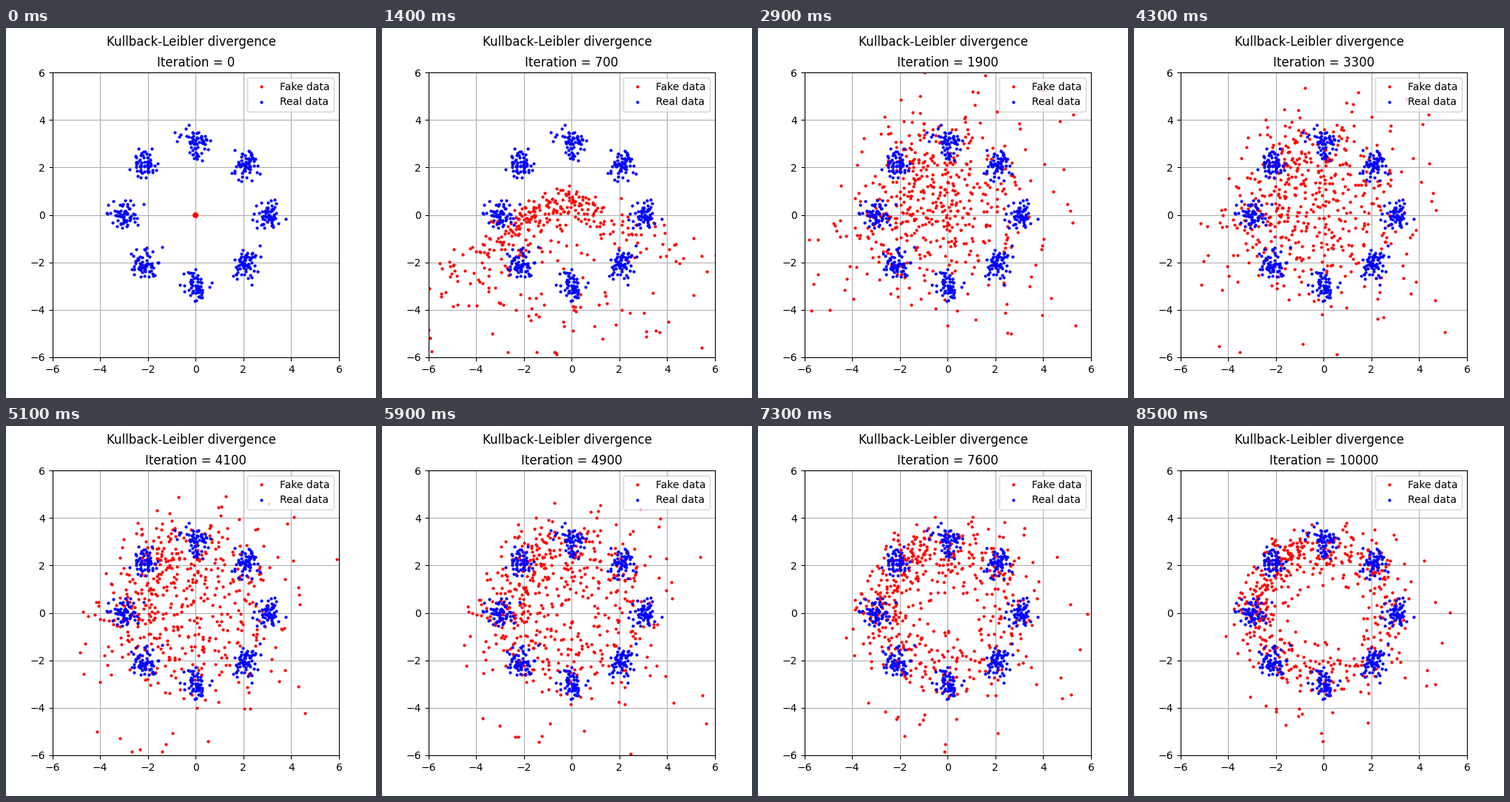
Animation of 500x500 px, one loop 8600 ms. Source, as a matplotlib script:

```python
import numpy as np
import matplotlib.pyplot as plt
from matplotlib.animation import FuncAnimation

FRAMES, STEP = 86, 100
SPREAD, SETTLE = 14, 29  # frames where the arch is open, where the ring begins
N = 512
rng = np.random.default_rng(12)


def noise(s, n=N):
    return rng.normal(0, s, (n, 2))


def polar(r, a):
    return np.column_stack([r * np.cos(a), r * np.sin(a)])


# Eight real clusters on a circle, 64 points each
corner = np.repeat(np.arange(8) * np.pi / 4, N // 8)
real = polar(3, corner) + noise(.29)

# Latent coordinates of the fake points: direction and radius quantile
phi = rng.uniform(0, 2 * np.pi, N)
theta = phi - .38 * np.sin(phi - np.radians(125))
q = rng.uniform(0, 1, N)
phase = rng.uniform(0, 2 * np.pi, (N, 2))
blur = noise(.2)
drift = noise(.15)
seed = noise(.015) - [.02, 0]
lean = 1 - .4 * (1 - np.cos(theta + .7))


def make_arch():
    reach = .3 + 6.5 * q + 5.5 * q ** 6
    x = reach * np.cos(theta)
    slope = np.where(x < 0, .55, .36)
    fall = 3 * reach * ((1 - np.sin(theta)) / 2) ** 2.5
    return np.column_stack([x - .35, .65 - slope * np.abs(x) - fall]) + noise(.33)


arch = make_arch()


def ring(p):
    """Cloud that tightens into a ring as p goes from 0 to 1."""
    core = (3.8 - .6 * p) * q ** (.65 - .45 * p)
    tail = (2.5 + 5.5 * (1 - p) ** 1.5) * lean * q ** 8
    pos = polar(core + tail, theta)
    droop = .4 * (1 - p) ** 1.5
    pos[:, 1] -= droop * np.maximum(np.abs(pos[:, 0]) - 1, 0)
    return pos + [0, .25 * (1 - p)] + blur * (1 - .5 * p) + drift * p


def fake_cloud(n):
    if n <= SPREAD:
        pos = seed + (arch - seed) * n / SPREAD
    elif n <= SETTLE:
        u = (n - SPREAD) / (SETTLE - SPREAD)
        pos = arch + (ring(0) - arch) * u * (2 - u)
    else:
        pos = ring((n - SETTLE) / (FRAMES - 1 - SETTLE))
    return pos + .05 * min(n / 10, 1) * np.sin(1.1 * n + phase)


def iteration(n):
    return 50 * n + 50 * max(n - 20, 0) + 100 * max(n - 60, 0)


fig, ax = plt.subplots(figsize=(5, 5), dpi=100)
fig.suptitle("Kullback-Leibler divergence")
title = ax.set_title("Iteration = 0")
dots = dict(marker="o", ls="", ms=2, mew=1)
fake, = ax.plot([], [], color="red", label="Fake data", **dots)
ax.plot(*real.T, color="blue", label="Real data", **dots)
ax.set(xlim=(-6, 6), ylim=(-6, 6))
ax.grid(True)
ax.legend(loc="upper right")


def draw(n):
    fake.set_data(*fake_cloud(n).T)
    title.set_text(f"Iteration = {iteration(n)}")
    return fake, title


anim = FuncAnimation(fig, draw, frames=FRAMES, interval=STEP,
                     init_func=lambda: draw(0), repeat=True, repeat_delay=0)
plt.show()
```
